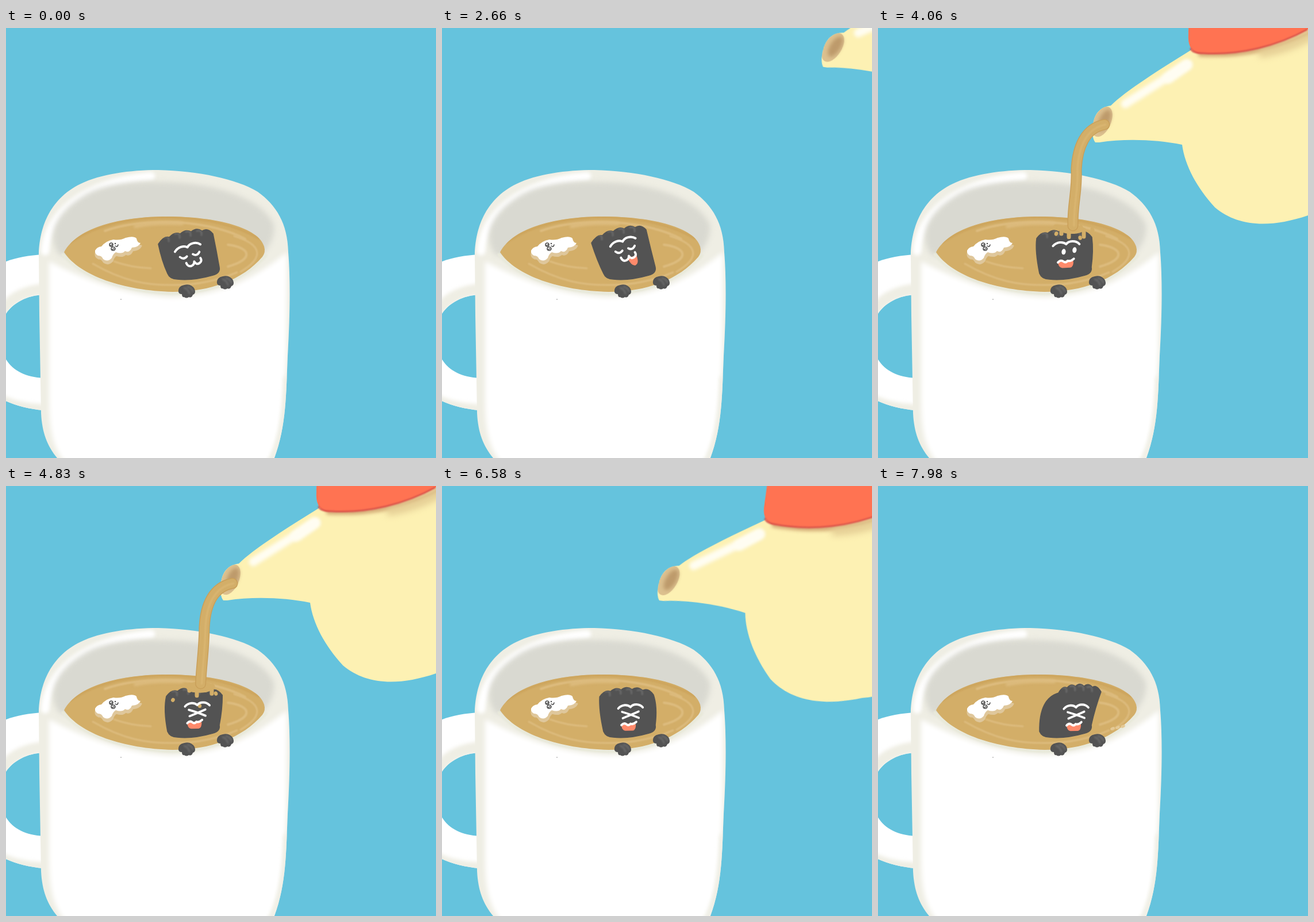
Recreate the animation shown at these times as an HTML page with a canvas. Size 748x748 px, loop 8000 ms.

```html
<!DOCTYPE html>
<html lang="en">
<head>
<meta charset="utf-8">
<title>Coffee bath</title>
<style>
html, body { margin: 0; width: 100%; height: 100%; overflow: hidden; background: #65c3dd; }
canvas { display: block; width: 100vw; height: 100vh; }
</style>
</head>
<body>
<canvas id="stage" width="748" height="748"></canvas>
<script>
const SIZE = 748, LOOP = 8000, STEP = 70;
const COFFEE = '#d3ae68', FOAM = '#ddbc7f', DARK = '#535353', CREAM = '#efeee4', TONGUE = '#ff8a6b';
const stage = document.getElementById('stage').getContext('2d');
let g = stage;

const clamp = v => Math.max(0, Math.min(1, v));
const ramp = (t, a, b) => clamp((t - a) / (b - a));
const ease = u => u * u * (3 - 2 * u);
const mix = (a, b, u) => a.map((v, i) => v + (b[i] - v) * u);

function fill(d, color, blur = 0) {
  g.filter = blur ? `blur(${blur}px)` : 'none';
  g.fillStyle = color;
  g.fill(new Path2D(d));
  g.filter = 'none';
}
function line(d, color, width, blur = 0) {
  g.filter = blur ? `blur(${blur}px)` : 'none';
  g.strokeStyle = color;
  g.lineWidth = width;
  g.lineCap = g.lineJoin = 'round';
  g.stroke(new Path2D(d));
  g.filter = 'none';
}
function oval(x, y, rx, ry, color, turn = 0) {
  g.fillStyle = color;
  g.beginPath();
  g.ellipse(x, y, rx, ry, turn, 0, 7);
  g.fill();
}
function within(d, draw) {
  g.save();
  g.clip(new Path2D(d));
  draw();
  g.restore();
}
function layer(draw, w = SIZE, h = SIZE, dx = 0, dy = 0) {
  const c = document.createElement('canvas');
  c.width = w;
  c.height = h;
  g = c.getContext('2d');
  g.translate(dx, dy);
  draw();
  g = stage;
  return c;
}

function drawHandle() {
  const top = 'M66 394C40 395 15 400 -2 407V500C10 480 34 465 66 464Z';
  const low = 'M-2 573C10 595 32 607 66 609V665C40 663 15 656 -2 648Z';
  fill(top, '#fff');
  fill(low, '#fff');
  within(top, () => line('M-4 489C10 470 34 457 70 454', CREAM, 20, 3));
  within(low, () => line('M-4 648C15 656 38 662 70 662', CREAM, 16, 3));
}

function drawMug() {
  const outer = 'M57 395C58 350 74 298 130 271C165 254 215 247 265 247C335 249 400 262 438 285' +
    'C470 308 490 340 491 390C495 440 494 500 490 570C487 640 488 700 462 760H100' +
    'C75 735 63 710 61 670L58 500Z';
  fill(outer, CREAM);
  within(outer, () => {
    line('M68 388C72 326 132 269 252 258', '#fff', 15, 3);
    fill('M92 394C70 360 85 318 145 286C180 269 235 266 280 268C375 270 450 302 466 342C469 364 456 382 446 394L290 440Z', '#d9d9d1', 5);
    fill('M75 406C150 445 220 466 290 469C380 465 436 432 489 390L488 560C484 680 474 725 458 765H110C80 732 75 700 75 640Z', '#fff', 4);
    line('M487 610C486 690 474 725 457 758', CREAM, 8, 3);
  });
}

function drawCoffee() {
  const pool = 'M101 390C125 346 201 328 280 328C368 328 440 348 449 380Q452 390 446 398C412 438 355 459 290 459C205 457 128 431 101 390Z';
  line('M99 394C128 432 205 459 290 462C360 460 414 438 452 396', '#e8e9da', 5, 1);
  fill(pool, COFFEE);
  within(pool, () => {
    line('M112 373C160 340 225 329 285 329C350 331 400 343 440 366', '#cda55d', 4, 1);
    line('M172 353C205 341 248 336 300 338C350 342 390 353 416 367', FOAM, 4, 1);
    line('M225 345C258 338 286 339 306 340', FOAM, 6, 2);
    line('M386 377C426 382 432 402 386 415', FOAM, 4, 1);
    line('M397 362C447 377 449 400 408 424', FOAM, 3, 1);
    line('M188 406Q218 417 252 418M151 410C205 441 245 448 294 447Q350 447 402 425', FOAM, 3, 1);
  });
}

function drawMilk() {
  const blob = 'M155 387Q158 381 166 380Q174 370 187 368Q198 370 208 365Q222 361 227 366' +
    'Q228 374 234 374Q231 381 219 382Q215 392 207 388Q202 394 191 390Q186 393 184 400' +
    'Q177 408 169 402Q166 395 160 396Q154 393 155 387Z';
  g.save();
  g.translate(1, 5);
  fill(blob, '#dfc79b');
  line(blob, '#dfc79b', 3);
  g.restore();
  fill(blob, '#fff');
  line('M180 377a3 3 0 1 0 6 0a3 3 0 1 0 -6 0M183 384a3.5 3 0 1 0 7 0a3.5 3 0 1 0 -7 0M182 378l3 -1M185 385l3 -1M190 379Q194 382 195 377', '#484848', 1.5);
  oval(190, 375, 1.2, 1.2, '#484848');
}

const scene = layer(() => {
  g.fillStyle = '#65c3dd';
  g.fillRect(0, 0, SIZE, SIZE);
  drawHandle();
  drawMug();
  drawCoffee();
  drawMilk();
  oval(200, 472, 1, 0.8, '#999');
});

// The teapot turns about its spout tip.
const TIP = [377, 199], PAD = 220;
const pot = layer(() => {
  const body = 'M378 199Q371 190 374 168C377 147 388 137 405 135C430 110 490 72 545 38L600 -210H980V250' +
    'C880 260 810 315 748 326C680 349 625 345 586 312C555 278 534 240 529 203C485 194 430 192 385 199Z';
  const lid = 'M550 -210C538 -100 542 -20 540 10Q538 38 556 44C630 49 695 31 748 2L900 -210Z';
  fill(body, '#fdf1b3');
  within(body, () => {
    line('M560 46C640 50 700 34 756 6', '#c99b68', 6, 3);
    line('M668 44Q716 36 756 12', '#e4cd94', 14, 6);
    line('M430 132L538 64', '#fffdf2', 15, 3);
    line('M505 87L537 64', '#fffdf2', 19, 3);
  });
  fill(lid, '#ff7352');
  line('M544 36Q548 44 565 44C630 48 695 31 746 3', '#d9544a', 3, 1);
  within(body, () => {
    oval(390, 163, 15, 28, '#dcc08f', 0.42);
    g.filter = 'blur(3px)';
    oval(394, 161, 9, 20, '#bd9a6b', 0.42);
    g.filter = 'none';
  });
}, 1200, 640, 0, PAD);

function drawPot(t) {
  const come = 1 - ease(ramp(t, 2450, 3130)), leave = ease(ramp(t, 6650, 7310));
  if (come === 1 || leave === 1) return;
  const tilt = 8 * (1 - ease(ramp(t, 3130, 3440))) + 8 * ease(ramp(t, 6400, 6640));
  g.save();
  g.translate(TIP[0] + 369 * come + 286 * leave, TIP[1] - 170 * come - 230 * leave);
  g.rotate(tilt * Math.PI / 180);
  g.drawImage(pot, -TIP[0], -TIP[1] - PAD);
  g.restore();
}

// Pose: top left, top right, left curve, right curve, eye centre, face angle, mouth shift
const REST = [265, 376, 360, 358, 271, 405, 366, 387, 319, 394, -15, 4];
const LOW = [271, 370, 366, 362, 276, 402, 368, 390, 321, 394, -9, 3];
const HIGH = [260, 374, 355, 351, 270, 405, 363, 385, 318, 384, -17, 2];
const WET = [276, 366, 372, 364, 273, 388, 375, 387, 328, 389, -3, -2];
const SOAKED = [280, 366, 378, 364, 274, 390, 377, 390, 335, 396, -1, -7];
const LEFT = [251, 369, 328, 360, 268, 392, 367, 360, 301, 404, -3, 9];
const RIGHT = [314, 360, 388, 358, 280, 370, 378, 385, 345, 398, -2, -5];
const KEYS = [[0, REST], [1260, LOW], [2660, HIGH], [3520, LOW], [3640, WET], [4700, WET], [4900, SOAKED], [LOOP, SOAKED]];

function poseAt(t) {
  const i = KEYS.findIndex(k => k[0] > t);
  const [a, from] = KEYS[i - 1], [b, to] = KEYS[i];
  const pose = mix(from, to, ease(ramp(t, a, b)));
  const swing = Math.cos((t - 7140) / 560 * 2 * Math.PI) * ramp(t, 6500, 6900);
  return mix(pose, swing > 0 ? LEFT : RIGHT, Math.abs(swing));
}

function drawBody(p) {
  const [lx, ly, rx, ry, clx, cly, crx, cry] = p;
  const n = 5;
  const crest = (u, lift = 0) => [lx + (rx - lx) * u, ly + (ry - ly) * u - 11 * Math.sqrt(Math.sin(Math.PI * clamp(u))) - lift];
  let top = `M${lx} ${ly}`, ridges = '';
  for (let i = 1; i <= n; i++) {
    const [x, y] = crest(i / n);
    top += `Q${crest((i - 0.5) / n, 7)} ${x} ${y}`;
    if (i < n) ridges += `M${x - 9} ${y}Q${x} ${y - 3} ${x - 1} ${y + 7}`;
  }
  const body = top + `Q${crx} ${cry} 371 416Q373 427 360 430Q325 440 298 437Q285 437 281 427Q${clx} ${cly} ${lx} ${ly}Z`;
  fill(body, DARK);
  line(body, DARK, 1.5);
  within(body, () => line(ridges, '#676767', 3.5, 1));
}

function drawFace(p, t) {
  const [x, y, angle, shift] = p.slice(8);
  const asleep = t < 3640, squint = t >= 4780;
  g.save();
  g.translate(x, y);
  g.rotate(angle * Math.PI / 180);
  if (squint) g.scale(0.93, 1);
  line('M-23 -11C-16 -18 -5 -18 0 -13C5 -19 17 -19 23 -12', '#fff', 4);
  if (asleep) {
    line('M-17 0Q-12 7 -5 2M6 1Q12 7 18 0', '#fff', 3.8);
  } else if (squint) {
    line('M-16 -5Q-2 -1 15 6M15 -5Q2 0 -15 6', '#fff', 3.8);
  } else {
    oval(-5, 0, 3.6, 5, '#fff', 0.2);
    oval(14, -2, 3.6, 5, '#fff', 0.2);
  }
  g.translate(shift, 14);
  if (asleep) {
    if (t >= 2100) fill('M-2 3L14 3Q15 18 7 19Q0 18 -2 3Z', TONGUE);
    line('M-13 -1Q-12 7 -5 6Q0 5 1 0Q3 7 9 5Q15 3 13 -3', '#fff', 4);
  } else {
    const edge = Math.max(0, shift) - 14;
    fill(`M${edge} 5Q0 -1 13 3Q13 13 7 14H${edge + 7}Q${edge + 1} 13 ${edge} 5Z`, TONGUE);
    line('M-14 4Q-9 -1 -4 3Q0 6 3 2Q8 4 14 -1', '#fff', 4);
  }
  g.restore();
}

function drawPaw(x, y) {
  g.save();
  g.translate(x, y);
  fill('M-14 1Q-15 -9 -4 -11Q8 -14 14 -4Q17 4 11 6Q9 12 4 10Q0 13 -4 10Q-8 11 -8 5Q-13 5 -14 1Z', DARK);
  line('M2 -8Q9 -6 11 0M-4 -6Q3 -4 5 4', '#6a6a6a', 3, 1.5);
  g.restore();
}

function drawStream(t) {
  const head = ramp(t, 3450, 3570), tail = ramp(t, 6270, 6400), length = 240;
  if (!head || tail === 1) return;
  const sway = 2 * Math.sin(t / 90), low = 3 * ramp(t, 4300, 5400);
  const path = `M394 ${168 + low}C360 ${174 + low} 347 208 345 245C${345 + sway} 285 ${340 - sway} 305 ${339 - low / 3} 344`;
  g.save();
  g.setLineDash([(head - tail) * length, 999]);
  g.lineDashOffset = -tail * length;
  line(path, '#c99f59', 19);
  line(path, COFFEE, 16);
  g.translate(2, 0);
  line(path, '#dab672', 3, 1);
  g.restore();
}

function drawSplash(t) {
  const spread = ramp(t, 3570, 3700) * (1 - ramp(t, 6360, 6560));
  if (!spread) return;
  const soak = ramp(t, 4300, 5200);
  oval(337, 350, (22 + 3 * soak) * spread, (8 + 3 * soak) * spread, COFFEE);
  for (let i = 0; i < 4; i++) {
    const x = 319 + i * 13, fall = 8 + 6 * Math.sin(i * 2.4 + t / 130);
    line(`M${x} 351V${351 + fall * spread}`, COFFEE, 7 * spread);
  }
  for (let i = 0; i < 7; i++) {
    const u = (t / 490 + i * 0.37) % 1, side = (i - 3) * 17;
    const x = 337 + side * (0.4 + 0.6 * u), y = 350 - 34 * u + 70 * u * u;
    oval(x, y, 3.2, 4.5 - u, COFFEE, -side / 90);
  }
}

function drawFlicks(t) {
  if (t < 6600) return;
  const u = ((t - 6440) % 560) / 560 - 0.25;
  for (let i = 0; i < 3; i++) {
    oval(373 + i * 9 + u * 70, 385 - i * 2 + u * 74, 4, 2.5, '#e4c995', -0.4);
    if (u < 0.3) oval(223 + i * 9 - u * 70, 397 - i * 2 + u * 40, 5, 3, '#e4c995', -0.4);
  }
}

const start = performance.now();
function frame(now) {
  const t = Math.floor((Math.max(0, now - start) % LOOP) / STEP) * STEP;
  const pose = poseAt(t);
  g.drawImage(scene, 0, 0);
  drawFlicks(t);
  drawBody(pose);
  drawSplash(t);
  drawFace(pose, t);
  drawPaw(314, 458);
  drawPaw(381, 443);
  drawPot(t);
  drawStream(t);
  requestAnimationFrame(frame);
}
frame(start);
</script>
</body>
</html>
```
